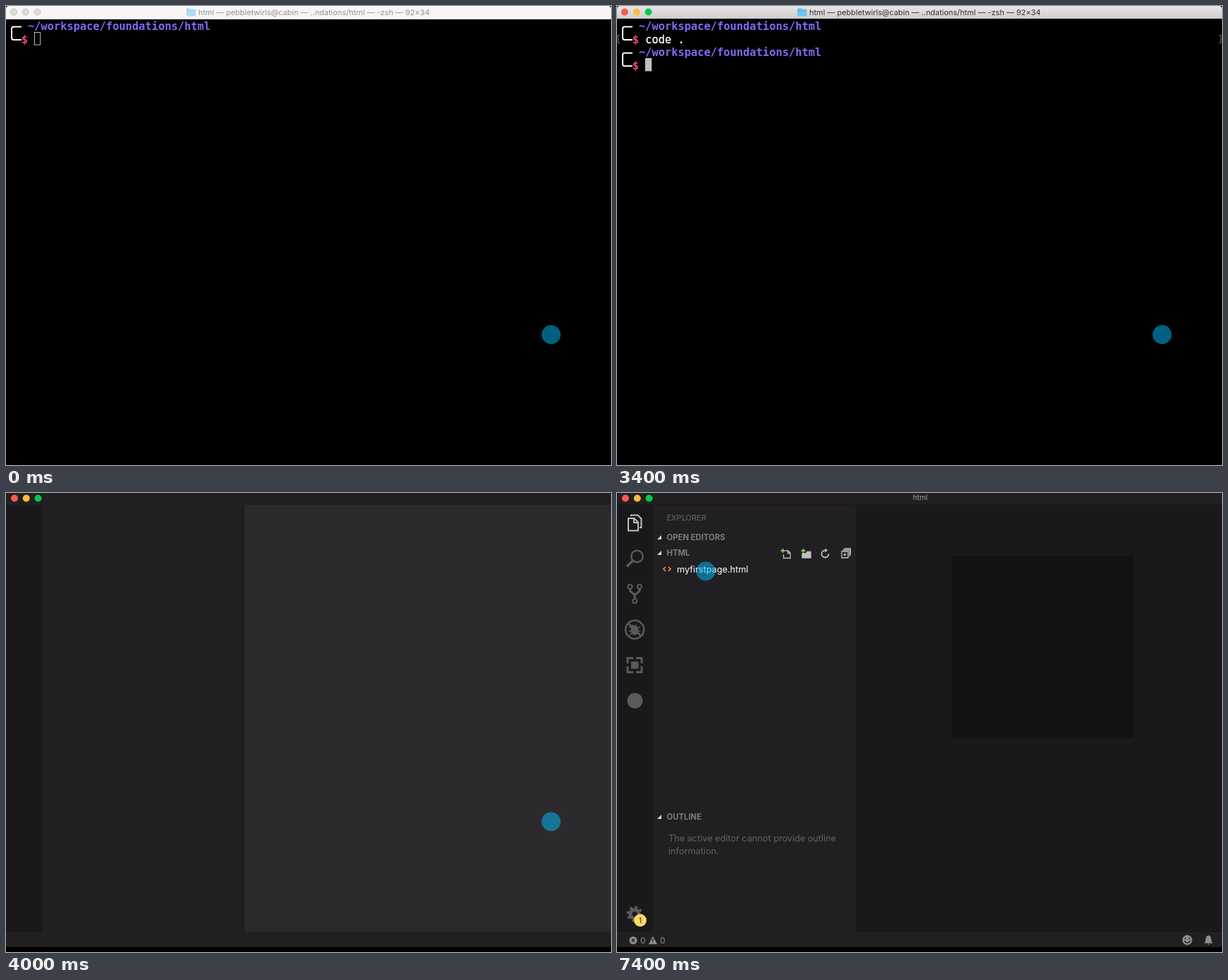
These frames come from a looping animation (859 by 652 pixels, 8 s). An HTML page:

```html
<!DOCTYPE html>
<html lang="en">
<head>
<meta charset="utf-8">
<title>Opening a folder in the editor</title>
<style>
html, body { margin: 0; width: 100%; height: 100%; overflow: hidden; background: #000; }
svg { display: block; }
text { font-family: Inter, sans-serif; }
.mono { font: 15.38px "DejaVu Sans Mono", monospace; }
.path { font-weight: bold; fill: #7b6cf6; }
.dollar { font-weight: bold; fill: #f9476f; }
.line { fill: none; stroke: currentColor; stroke-width: 2; }
.head { font-size: 11.3px; font-weight: 700; fill: #7d7b7d; }
.body { font-size: 12.7px; }
</style>
</head>
<body>
<svg width="859" height="652" viewBox="0 0 859 652">
  <defs>
    <linearGradient id="chrome" x2="0" y2="1">
      <stop stop-color="#e6e6e6"/><stop offset="1" stop-color="#cecece"/>
    </linearGradient>
    <g id="lights">
      <circle r="5" fill="#fc5753"/><circle cx="16.8" r="5" fill="#fdbc40"/><circle cx="33.6" r="5" fill="#08c94b"/>
    </g>
    <g id="prompt">
      <path d="M22 29.5H11Q8 29.5 8 32.5V45Q8 48 11 48H22" fill="none" stroke="#fff" stroke-width="2"/>
      <text class="mono path" x="31" y="33.8">~/workspace/foundations/html</text>
      <text class="mono dollar" x="21.7" y="52.5">$</text>
    </g>
    <path id="twist" d="M6 0V6H0Z" fill="#d6d5d6"/>
  </defs>

  <g id="terminal">
    <path id="bar" d="M0 18V4Q0 0 4 0H855Q859 0 859 4V18Z"/>
    <path id="edge" d="M0 18.5H859" stroke="#e4e4e4"/>
    <use id="lightsOn" href="#lights" x="11" y="8.5"/>
    <g id="lightsOff" fill="#dcdcdc" stroke="#c6c6c6">
      <circle cx="11" cy="8.5" r="4.6"/><circle cx="27.8" cy="8.5" r="4.6"/><circle cx="44.6" cy="8.5" r="4.6"/>
    </g>
    <g id="caption">
      <path d="M256 4.5Q256 3 257.5 3H261L262.5 4.5H268Q269.5 4.5 269.5 6V13Q269.5 14.5 268 14.5H257.5Q256 14.5 256 13Z" fill="#6cc5f3"/>
      <path d="M256 6.5H269.5" stroke="#4fb0e4"/>
      <text x="273" y="12.7" font-size="10.97" fill="#333">html — pebbletwirls@cabin — ..ndations/html — -zsh — 92×34</text>
    </g>
    <use href="#prompt"/>
    <text id="command" class="mono" x="40.3" y="52.5" fill="#fff" stroke="#fff" stroke-width=".3"></text>
    <path id="marks" d="M4 41.5H1.5V52.5H4M855 41.5H857.5V52.5H855" fill="none" stroke="#777"/>
    <use id="nextPrompt" href="#prompt" y="37.2"/>
    <rect id="cursor"/>
  </g>

  <g id="editor">
    <rect width="859" height="652"/>
    <rect width="859" height="645" rx="4" fill="#2d2a2e"/>
    <g id="layout">
      <path d="M0 17V4Q0 0 4 0H855Q859 0 859 4V17ZM51 17H339V623H51ZM0 623H859V641Q859 645 855 645H4Q0 645 0 641Z" fill="#221f22"/>
      <path d="M0 17H51V623H0Z" fill="#19181a"/>
    </g>
    <g id="content">
      <path d="M339 16H859V624H339ZM0 16H859V17H0ZM0 623H859V624H0Z" fill="#19181a"/>
      <rect id="watermark" x="475" y="90" width="258" height="258" fill="#121113"/>
      <text x="420" y="10.3" font-size="10.3" fill="#a3a2a3">html</text>

      <g color="#c1c0c0" class="line">
        <path d="M16 36H24.5L30 41.5V53.5H16ZM24 36.5V42H30M20 33V31.5H29.5L34.5 36.5V49H32"/>
      </g>
      <g color="#5b595c" class="line">
        <circle cx="28.5" cy="90" r="8.3" stroke-width="2.5"/>
        <path d="M22 96.5L14 104.5" stroke-width="3.5"/>
        <circle cx="18.5" cy="133" r="3"/><circle cx="32" cy="133" r="3"/><circle cx="25.2" cy="153.5" r="3"/>
        <path d="M18.5 136V139L25.2 145V150.5M32 136V139L25.2 145" stroke-width="3"/>
        <ellipse cx="25" cy="195" rx="4.5" ry="6" fill="currentColor"/>
        <path d="M17 190L21 192M16.5 196H21M18 202L21 199M33 190L29 192M33.5 196H29M32 202L29 199M22 187L24 190M28 187L26 190" stroke-width="1.5"/>
        <circle cx="25.2" cy="194" r="13" stroke-width="2.6"/>
        <path d="M16 185L34.5 203.5" stroke-width="2.6"/>
        <path d="M23 234.5H15V242M15 246V254.5H23M27 254.5H35V246M35 242V234.5H27" stroke-width="3"/>
        <rect x="20" y="239.5" width="10.5" height="10" fill="currentColor" stroke="none"/>
        <circle cx="25.5" cy="295" r="11" fill="currentColor" stroke="none"/>
        <circle cx="25" cy="598" r="6" stroke-width="5"/>
        <circle cx="25" cy="598" r="9.5" stroke-width="3.5" stroke-dasharray="3.73"/>
      </g>
      <circle cx="33" cy="607" r="9" fill="#ffd866"/>
      <text x="33" y="611" font-size="11" text-anchor="middle" fill="#2d2a2e">1</text>

      <text x="70.5" y="38.7" font-size="11" fill="#696769">EXPLORER</text>
      <g class="head">
        <use href="#twist" x="57" y="60"/><text x="70.5" y="67">OPEN EDITORS</text>
        <use href="#twist" x="57" y="82"/><text x="70.5" y="89">HTML</text>
        <use href="#twist" x="57" y="457"/><text x="70.5" y="464">OUTLINE</text>
      </g>
      <path id="plainIcon" d="M67.5 105H74M67.5 107H74M67.5 109H74M67.5 111H74" stroke="#c9ab57" stroke-width="1.2"/>
      <path id="codeIcon" d="M69 105L66 108L69 111M73 105L76 108L73 111" fill="none" stroke="#fc8452" stroke-width="1.7"/>
      <text id="file" class="body" x="85" y="112.5">myfirstpage.html</text>
      <g class="body" fill="#636164">
        <text x="73" y="495">The active editor cannot provide outline</text>
        <text x="73" y="512.8">information.</text>
      </g>

      <g id="actions" color="#c1c0c0" class="line" style="stroke-width:1.3">
        <path d="M239 82H243L246 85V92.5H236.5V87M242.5 82V85.5H246"/>
        <path d="M263 87V92H275V83.5H270L268.5 86H263Z" fill="currentColor"/>
        <path d="M300.5 86.5A5 5 0 1 1 295.5 81.5" stroke-width="1.8"/>
        <path d="M295.5 78.5L299 81.5L295.5 84.5Z" fill="currentColor" stroke="none"/>
        <path d="M319 83H328V92H319ZM321 81.5V81H330V90H329.5M323 79.5V79H331.5V88M321.5 87.5H325.5M323.5 85.5V89.5"/>
        <path d="M232.5 82H238.5M235.5 79V85M261.5 82H267.5M264.5 79V85" stroke="#7fc96b" stroke-width="1.8"/>
      </g>

      <g fill="#8f8e8f">
        <circle cx="23" cy="635.5" r="5.5"/>
        <path d="M51 629.5L57 641H45Z"/>
        <g font-size="12"><text x="33" y="639.5">0</text><text x="61" y="639.5">0</text></g>
        <circle cx="809.7" cy="635" r="7"/>
        <path d="M833.5 639.5Q836 637 836 633Q836 629 839.7 628.5Q843.5 629 843.5 633Q843.5 637 846 639.5ZM838 640.5H841.5L839.7 642Z"/>
      </g>
      <path d="M21 633.5L25 637.5M25 633.5L21 637.5M51 633V637M51 638.3V639.5M807 631.5V634M812.5 631.5V634M805.5 636Q809.7 642 814 636" fill="none" stroke="#221f22" stroke-width="1.4"/>
    </g>
    <use href="#lights" x="12" y="7.5"/>
  </g>

  <circle id="pointer" r="13.5" fill="#00c0ff" fill-opacity=".5"/>
</svg>
<script>
const LOOP = 8000, STEP = 200, COL = 9.27, ROW = 18.6;
const el = id => document.getElementById(id);
const show = (id, on) => el(id).style.display = on ? "" : "none";
const set = (id, attrs) => Object.entries(attrs).forEach(([k, v]) => el(id).setAttribute(k, v));
const progress = (t, start, end) => Math.min(1, Math.max(0, (t - start) / (end - start)));
const ease = u => u * u * (3 - 2 * u);

function drawTerminal(t) {
  const active = t >= 400;
  show("lightsOn", active);
  show("lightsOff", !active);
  show("edge", !active);
  set("bar", { fill: active ? "url(#chrome)" : "#f6f6f6" });
  set("caption", { opacity: active ? 1 : 0.5 });

  const keys = Math.max(0, (t - 1200) / STEP);
  const typed = Math.min(6, keys + (keys > 2));
  el("command").textContent = "code .".slice(0, typed);

  const entered = t >= 2800, prompted = t >= 3000;
  show("marks", entered);
  show("nextPrompt", prompted);
  const col = prompted ? 4 : entered ? 0 : 4 + typed;
  const row = prompted ? 3 : entered ? 2 : 1;
  const inset = active ? 0 : 0.5;
  set("cursor", {
    x: Math.round(3.2 + col * COL) + inset, y: Math.round(18.5 + row * ROW) + inset,
    width: COL - 2 * inset, height: ROW - 2 * inset,
    fill: active ? "#bfbfbf" : "none", stroke: active ? "none" : "#bfbfbf"
  });
}

function drawEditor(t, x, y) {
  show("layout", t >= 3800);
  show("content", t >= 4800 || t >= 3800 && t < 4000);
  const ready = t >= 5000;
  show("watermark", ready);
  show("codeIcon", ready);
  show("plainIcon", !ready);
  show("actions", x < 339);
  set("file", { fill: x < 339 && y < 120 ? "#fff" : "#b9b8b9" });
}

function frame(now) {
  const t = Math.floor(now % LOOP / STEP) * STEP;
  const first = ease(progress(t, 5400, 6000)), second = ease(progress(t, 6200, 7400));
  const x = 774 - 322 * first - 326 * second;
  const y = 466.7 - 168 * first - 187.7 * second;
  const open = t >= 3600;
  show("terminal", !open);
  show("editor", open);
  if (open) drawEditor(t, x, y);
  else drawTerminal(t);
  set("pointer", { cx: x, cy: y });
  requestAnimationFrame(() => frame(performance.now() - start));
}
const start = performance.now();
frame(0);
</script>
</body>
</html>
```
